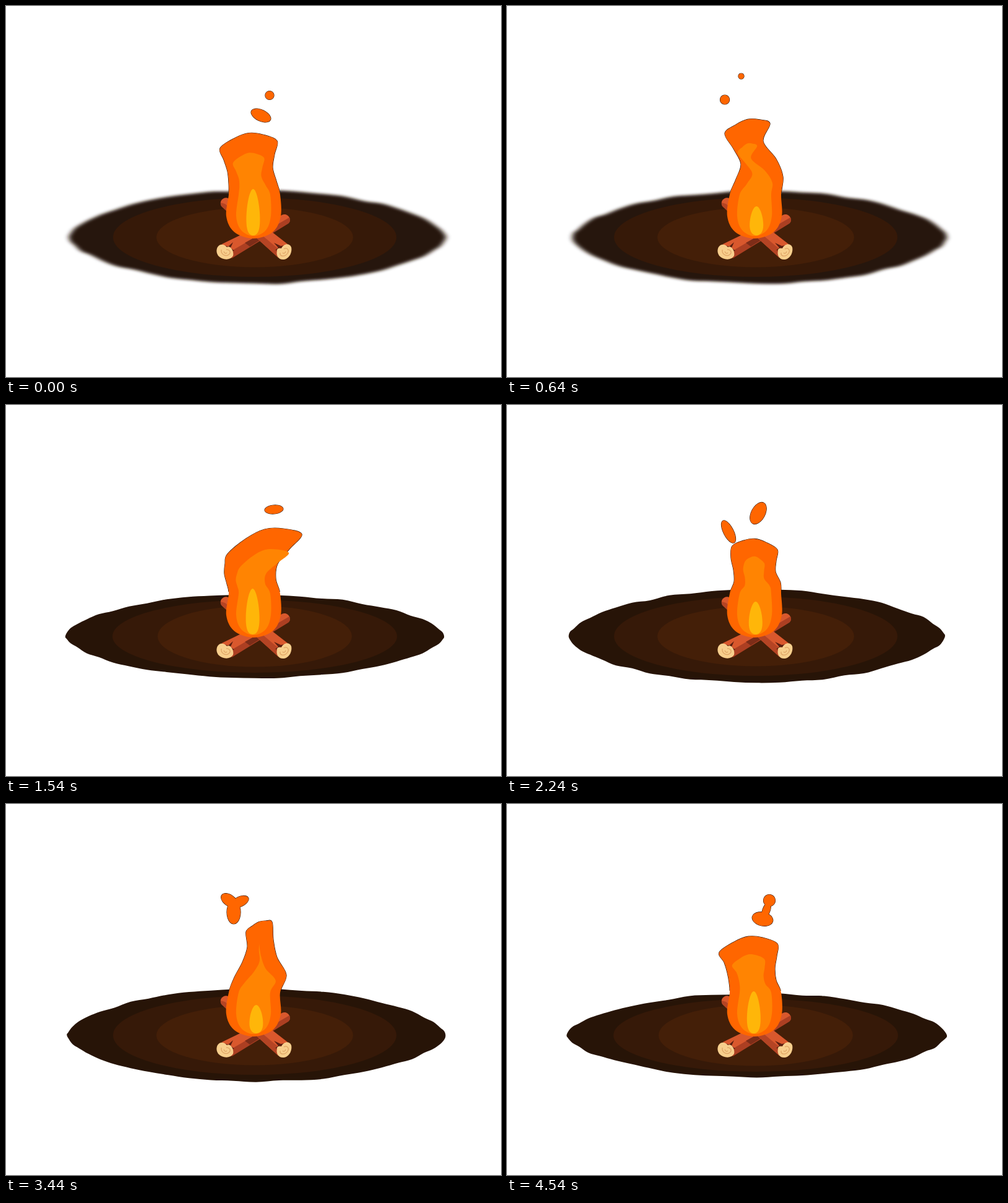
An HTML page that plays this animation: 800x600 px, repeating every 4640 ms.

```html
<!DOCTYPE html>
<html lang="en">
<head>
<meta charset="utf-8">
<title>Campfire</title>
<style>
  html, body { margin: 0; width: 100%; height: 100%; overflow: hidden; background: #fff; }
  svg { display: block; width: 100vw; height: 100vh; }
</style>
</head>
<body>
<svg viewBox="0 0 800 600">
  <defs>
    <filter id="soft" x="-5%" y="-15%" width="110%" height="130%"><feGaussianBlur stdDeviation="4 2.2"/></filter>
    <filter id="glow" x="-30%" y="-10%" width="160%" height="120%"><feGaussianBlur stdDeviation=".7"/></filter>
    <clipPath id="sky"><rect width="800" height="302"/></clipPath>
  </defs>
  <path id="ground" fill="#271407"/>
  <ellipse id="earth" cx="402" cy="374" fill="#361908"/>
  <ellipse id="hearth" cx="402" cy="374" fill="#441f08"/>
  <g id="logs">
    <path fill="#d9582d" d="M349 385L446 338C454 334 463 344 457 351L363 408Z"/>
    <path fill="#ac3f22" d="M361 398L458 342Q461 348 456 352L365 408Z"/>
    <path fill="#7d2d18" d="M386 383L404 373L413 377L394 389Z"/>
    <path fill="#d9582d" d="M455 385L361 312C353 306 342 316 349 324L440 407Z"/>
    <path fill="#b54424" d="M347 318Q346 322 349 325L440 407L446 398L354 320Z"/>
    <path fill="#5b1f10" d="M349 386L359 389L367 382L363 391L369 396L360 397Z"/>
    <path fill="#5b1f10" d="M458 386L444 388L433 383L440 391L435 395L446 396Z"/>
    <g fill="#f8cf8d">
      <path d="M341 392C344 384 352 384 357 390C363 386 369 397 367 404C362 412 350 411 343 404Q339 398 341 392Z"/>
      <path d="M438 396C437 392 442 391 445 392C449 384 458 383 461 390C463 398 458 409 449 410C441 411 436 404 438 396Z"/>
    </g>
    <g fill="none" stroke="#dfa566" stroke-width="1.3">
      <path d="M348 394C347 402 355 406 360 402S360 393 356 394M352 397Q354 402 357 399"/>
      <path d="M443 399C442 406 451 406 455 400S453 390 449 393M447 399Q450 402 452 397"/>
    </g>
  </g>
  <path id="rim" fill="none" stroke="#2c1000" stroke-width="1.2" clip-path="url(#sky)"/>
  <path id="outer" fill="#ff6600"/>
  <path id="middle" fill="#ff8402"/>
  <path id="core" fill="#ffb609" filter="url(#glow)"/>
</svg>
<script>
const LOOP = 4640, RISE = 0.115, FOOT = 305;

// left and right: flame edges at four even heights from the foot up to the shoulder.
// tilt: how far the right shoulder stands above the left, halved.
// core: top of the bright core. drops: x, y, half width, half height, turn in degrees.
const poses = [
  { time: 0, shoulder: 224, tilt: 6, core: 296,
    left: [360, 358, 352, 346], right: [437, 431, 434, 438],
    drops: [[426, 144.5, 7], [412, 177, 17, 9, 25]] },
  { time: 640, shoulder: 198, tilt: 8, core: 324,
    left: [370, 378, 366, 352], right: [446, 435, 414, 425],
    drops: [[352, 151.5, 7.5], [378.5, 113.5, 4.5]] },
  { time: 1540, shoulder: 225, tilt: 16, core: 297,
    left: [357, 353, 354, 358], right: [436, 439, 458, 478],
    drops: [[433, 169, 15, 7, -5]] },
  { time: 2240, shoulder: 231, tilt: -3, core: 318,
    left: [367, 366, 362, 364], right: [442, 434, 435, 437],
    drops: [[406, 175, 11, 19, 28], [358, 205, 8, 20, -27]] },
  { time: 2740, shoulder: 176, tilt: 2, core: 290,
    left: [355, 355, 377, 358], right: [446, 430, 428, 433],
    drops: [] },
  { time: 3440, shoulder: 199, tilt: 8, core: 325,
    left: [369, 382, 390, 388], right: [453, 438, 432, 430],
    drops: [[361, 156, 15, 9, 35], [378, 158, 15, 8, -25], [368, 175, 11, 19, 0]] },
  { time: 4540, shoulder: 233, tilt: 7, core: 303,
    left: [359, 356, 351, 343], right: [435, 433, 436, 437],
    drops: [[424, 156, 9.5], [419, 172, 6, 14, 20], [413, 186, 17, 11, 12]] },
];

const el = id => document.getElementById(id);
const set = (id, attrs) => Object.entries(attrs).forEach(([k, v]) => el(id).setAttribute(k, v));
const mix = (a, b, u) => a + (b - a) * u;
const range = (n, f) => Array.from({ length: n }, (_, i) => f(i));

function blend(a, b, u) {
  const p = { left: a.left.map((v, i) => mix(v, b.left[i], u)),
              right: a.right.map((v, i) => mix(v, b.right[i], u)) };
  for (const key of ['shoulder', 'tilt', 'core']) p[key] = mix(a[key], b[key], u);
  return p;
}

// Closed Catmull-Rom curve through the points.
function curve(pts) {
  const n = pts.length, at = i => pts[(i + n) % n];
  let d = `M${at(0)}`;
  for (let i = 0; i < n; i++) {
    const [a, b, c, e] = [at(i - 1), at(i), at(i + 1), at(i + 2)];
    d += `C${b.map((v, j) => (v + (c[j] - a[j]) / 6).toFixed(2))} ` +
         `${c.map((v, j) => (v - (e[j] - b[j]) / 6).toFixed(2))} ${c}`;
  }
  return d + 'Z';
}

// Flame outline; inset and squash turn the outer flame into the one inside it.
function flame({ left, right, shoulder, tilt }, inset = 0, squash = 1) {
  const side = (xs, lean, sign) => [sign > 0 ? 360 : 443, ...xs].map((x, j) => {
    const h = j / 4;
    return [x + sign * inset * (1 + 0.3 * h), FOOT + (mix(0, shoulder - FOOT, h) + lean * h) * squash];
  });
  const l = side(left, tilt, 1), r = side(right, -tilt, -1);
  const [a, b] = [l[4], r[4]];
  const fork = Math.max(0, 195 - shoulder) * squash;
  const swell = 0.2 * (right[3] - left[3]) * squash;
  const crown = [1, 2, 3].map(k => [
    mix(a[0], b[0], k / 4),
    mix(a[1], b[1], k / 4) - swell * Math.sin(k * Math.PI / 4) + fork * [0, 0.5, -0.6][k - 1],
  ]);
  const bowl = range(5, i => [
    400 + (44 - inset) * Math.cos(i * Math.PI / 4),
    340 + (36 - inset / 4) * Math.sin(i * Math.PI / 4),
  ]);
  return [...l, ...crown, ...r.reverse(), ...bowl];
}

// Sideways ripples that climb the flame and fade out at each pose.
function ripple(pts, u, time, size) {
  return pts.map(([x, y]) => {
    const reach = Math.max(0, Math.min(1, (320 - y) / 80));
    return [x + size * Math.sin(Math.PI * u) * reach * Math.sin((y + RISE * time) / 12), y];
  });
}

// A drop leaves the flame, rises and shrinks away.
function dropPath([x, y, rx, ry = rx, turn = 0], age) {
  const life = Math.min(450, 24 * (rx + ry));
  const scale = age > 0 ? 1 - age / life : 1 - age / 1200;
  if (scale <= 0.05 || age < -450) return '';
  const c = Math.cos(turn * Math.PI / 180), s = Math.sin(turn * Math.PI / 180);
  return curve(range(12, i => {
    const px = scale * rx * Math.cos(i * Math.PI / 6), py = scale * ry * Math.sin(i * Math.PI / 6);
    return [x + px * c - py * s, y - RISE * age + px * s + py * c];
  }));
}

// A teardrop that leans with the flame.
function corePath({ core, left, right }) {
  const x = 400 + ((left[0] + right[0]) / 2 - 400) * 0.4;
  const bottom = 371, w = 11, h = bottom - core, wide = core + h * 0.65;
  const half = s => [`${x + s * w * 0.5} ${core}`, `${x + s * w} ${core + h * 0.35}`, `${x + s * w} ${wide}`,
    `${x + s * w} ${bottom - 6}`, `${x + s * w * 0.6} ${bottom}`];
  const r = half(1), l = half(-1);
  return `M${x} ${core}C${r[0]} ${r[1]} ${r[2]}C${r[3]} ${r[4]} ${x} ${bottom}` +
    `C${l[4]} ${l[3]} ${l[2]}C${l[1]} ${l[0]} ${x} ${core}Z`;
}

function random(seed) {
  return () => {
    seed = (seed * 1664525 + 1013904223) >>> 0;
    return seed / 4294967296;
  };
}

// The ground pulses between two sizes, with a rough edge that is new at each step.
function drawGround(step) {
  const big = step === 0 || step % 2 === 1, soft = step < 10;
  const rand = random(step * 7919 + 17);
  const left = (soft ? 104 : 97) + (rand() - 0.5) * 8, right = 709 + (rand() - 0.5) * 6;
  const cx = (left + right) / 2, rx = (right - left) / 2, ry = big ? 75 : 67.5;
  const edge = range(52, i => {
    const a = i / 26 * Math.PI, s = Math.sin(a);
    return [cx + rx * Math.cos(a), 374 + ry * s * Math.abs(s) ** 0.2 + (rand() - 0.5) * 3];
  });
  set('ground', { d: curve(edge), filter: soft ? 'url(#soft)' : 'none' });
  set('earth', { rx: big ? 229 : 230, ry: big ? 64 : 59 });
  set('hearth', { rx: big ? 159 : 157, ry: big ? 48.5 : 49.5 });
}

function draw(step) {
  const time = step ? 40 + 100 * (step - 1) : 0;
  const i = poses.findLastIndex(p => p.time <= time);
  const a = poses[i], b = poses[(i + 1) % poses.length];
  const end = b.time || LOOP;
  const u = (time - a.time) / (end - a.time);
  const now = blend(a, b, u);

  let body = curve(ripple(flame(now), u, time, 7));
  for (const drop of a.drops) body += dropPath(drop, time - a.time);
  if (u > 0) for (const drop of b.drops) body += dropPath(drop, time - end);

  set('outer', { d: body });
  set('rim', { d: body });
  set('middle', { d: curve(ripple(flame(now, 16, 0.68), u, time, 4)) });
  set('core', { d: corePath(now) });
  drawGround(step);
}

const start = performance.now();
let shown = -1;
function tick() {
  const t = (performance.now() - start) % LOOP;
  const step = t < 40 ? 0 : 1 + Math.floor((t - 40) / 100);
  if (step !== shown) draw(shown = step);
  requestAnimationFrame(tick);
}
tick();
</script>
</body>
</html>
```
